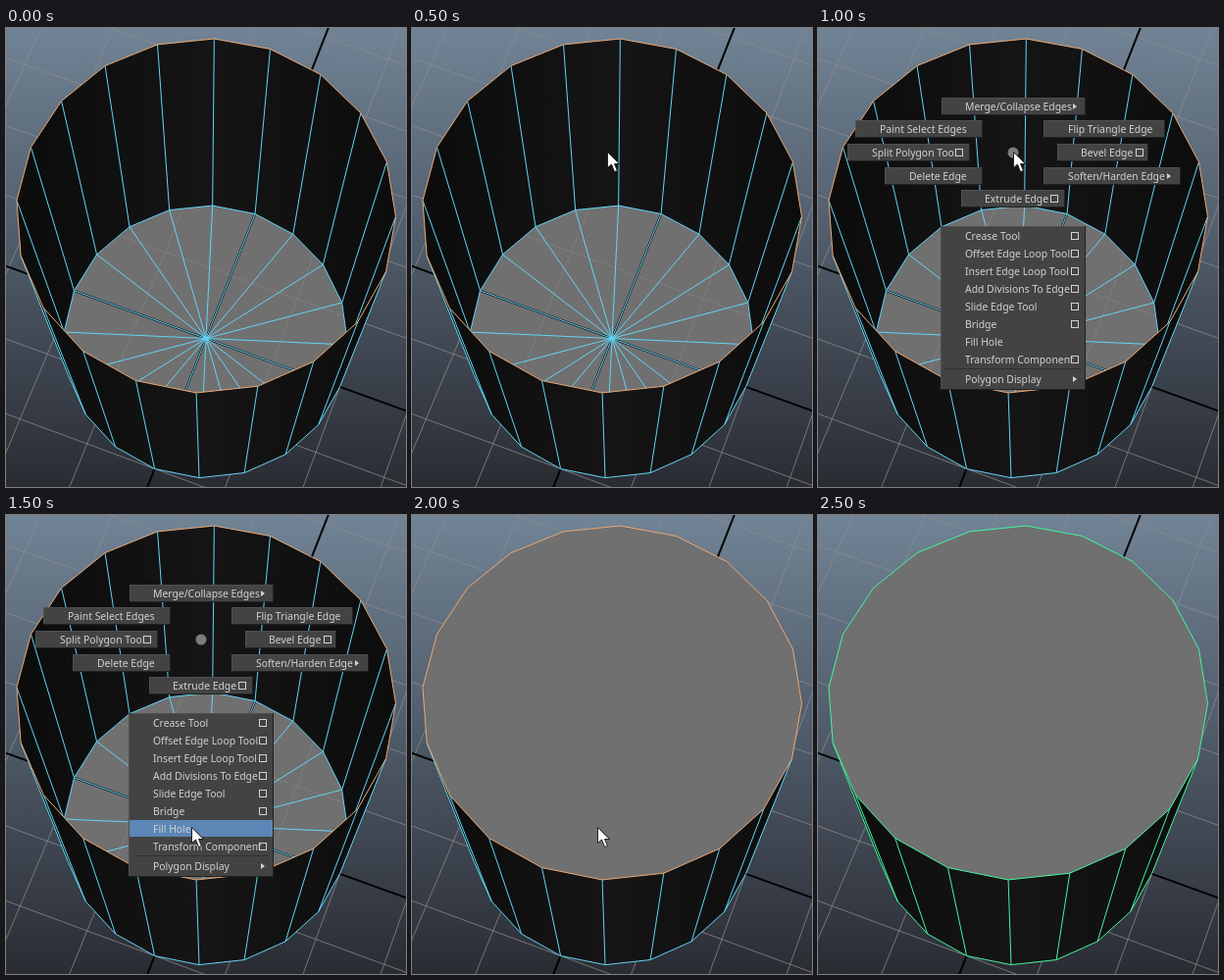
These frames come from a looping animation (408x468 px, 3 s). An HTML page with a canvas:

```html
<!DOCTYPE html>
<html lang="en">
<head>
<meta charset="utf-8">
<title>Fill Hole</title>
<style>
  html, body { margin: 0; width: 408px; height: 468px; overflow: hidden; }
  canvas { display: block; }
</style>
</head>
<body>
<canvas id="stage" width="408" height="468"></canvas>
<script>
const ctx = document.getElementById('stage').getContext('2d');
const W = 408, H = 468, SIDES = 20;
const CYAN = '#62d4f6', ORANGE = '#eba873', GREEN = '#43f5a0', GREY = '#707070';

// Perspective view of a horizontal plane: unit axes u, v around a centre.
const plane = (cx, cy, ux, uy, vx, vy, a, b) => (u, v) => {
  const depth = 1 + a * u + b * v;
  return [cx + (u * ux + v * vx) / depth, cy + (u * uy + v * vy) / depth];
};
const floorAt = plane(203.5, 316, 135.5, 49, 51.2, -129.9, -0.0074, 0.023);
const rimAt = plane(203.1, 183.5, 181, 63.5, 68.4, -168.8, -0.016, 0.0385);
const ring = at => Array.from({ length: SIDES }, (_, i) => {
  const angle = (i - 1) * 2 * Math.PI / SIDES;
  return at(Math.sin(angle), Math.cos(angle));
});
const rim = ring(rimAt), base = ring(floorAt), hub = floorAt(0, 0);
const FRONT = [6, 7, 8, 9, 10, 11, 12, 13, 14];

function trace(points, closed) {
  ctx.beginPath();
  points.forEach(p => ctx.lineTo(...p));
  if (closed) ctx.closePath();
}
function fill(points, color) {
  trace(points, true);
  ctx.fillStyle = color;
  ctx.fill();
}
function stroke(points, color, closed = false, width = 1) {
  trace(points, closed);
  ctx.strokeStyle = color;
  ctx.lineWidth = width;
  ctx.stroke();
}
function gradient(x, y, ...colors) {
  const g = ctx.createLinearGradient(0, 0, x, y);
  colors.forEach((c, i) => g.addColorStop(i / (colors.length - 1), c));
  return g;
}
const sky = gradient(0, H, '#718395', '#4e5967', '#2a2c33');
const wall = gradient(W, 0, '#0b0b0b', '#151515', '#0c0c0c');

function drawGrid(color) {
  for (let k = -4; k <= 4; k += 0.5) {
    if (!k) continue;
    stroke([floorAt(k, -4), floorAt(k, 4)], color);
    stroke([floorAt(-4, k), floorAt(4, k)], color);
  }
  stroke([floorAt(0, -4), floorAt(0, 4)], '#000', false, 2);
  stroke([floorAt(-4, 0), floorAt(4, 0)], '#000', false, 2);
}

function drawInside() {
  fill(rim, wall);
  ctx.save();
  trace(rim, true);
  ctx.clip();
  fill(base, GREY);
  ctx.save();
  trace(base, true);
  ctx.clip();
  drawGrid('#7d7d7d');
  ctx.restore();
  base.forEach((p, i) => {
    stroke([hub, p], CYAN);
    if (!FRONT.includes(i)) stroke([rim[i], p], CYAN);
  });
  stroke(base, CYAN, true);
  ctx.restore();
}

function drawCup(capped, edge, border) {
  const lower = FRONT.map(i => base[i]);
  fill([...FRONT.map(i => rim[i]), ...lower.slice().reverse()], wall);
  if (capped) fill(rim, GREY); else drawInside();
  FRONT.forEach(i => stroke([rim[i], base[i]], edge));
  stroke(lower, edge);
  stroke(rim, border, true);
}

// Marking menu: label, box left, top, width, text left, trailing mark and its x.
const RADIAL = [
  ['Merge/Collapse Edges', 126, 71, 147, 150, 'arrow', 260],
  ['Paint Select Edges', 38, 94, 130, 63],
  ['Flip Triangle Edge', 230, 94, 124, 255],
  ['Split Polygon Tool', 30, 118, 125, 55, 'box', 140],
  ['Bevel Edge', 244, 118, 93, 268, 'box', 324],
  ['Delete Edge', 68, 142, 100, 93],
  ['Soften/Harden Edge', 230, 142, 140, 255, 'arrow', 356],
  ['Extrude Edge', 146, 165, 106, 170, 'box', 237]
];
const LIST = ['Crease Tool', 'Offset Edge Loop Tool', 'Insert Edge Loop Tool',
  'Add Divisions To Edge', 'Slide Edge Tool', 'Bridge', 'Fill Hole',
  'Transform Component'];

function panel(x, y, w, h) {
  ctx.fillStyle = '#222';
  ctx.fillRect(x, y, w, h);
  ctx.fillStyle = '#505050';
  ctx.fillRect(x, y, w - 1, h - 1);
  ctx.fillStyle = '#434343';
  ctx.fillRect(x + 1, y + 1, w - 2, h - 2);
}
function label(text, x, y, mark, markX) {
  ctx.fillStyle = '#d2d2d2';
  ctx.fillText(text, x, y + 4);
  if (mark === 'box') {
    ctx.strokeStyle = '#d2d2d2';
    ctx.lineWidth = 1;
    ctx.strokeRect(markX + 0.5, y - 3.5, 7, 7);
  }
  if (mark === 'arrow') fill([[markX, y - 3], [markX + 4, y], [markX, y + 3]], '#d2d2d2');
}

function drawMenu(selected) {
  ctx.font = '10.4px "Noto Sans", "Open Sans", sans-serif';
  for (const [text, x, y, w, textX, mark, markX] of RADIAL) {
    panel(x, y, w, 18);
    label(text, textX, y + 9, mark, markX);
  }
  ctx.beginPath();
  ctx.arc(199, 127, 5.5, 0, 7);
  ctx.fillStyle = '#7c7c7c';
  ctx.fill();

  panel(125, 202, 148, 167);
  LIST.forEach((text, i) => {
    const y = 212 + i * 18;
    if (text === selected) {
      ctx.fillStyle = '#5c86b6';
      ctx.fillRect(126, y - 9, 146, 17);
    }
    label(text, 150, y, text === 'Fill Hole' ? '' : 'box', 258);
  });
  ctx.fillStyle = '#303030';
  ctx.fillRect(130, 347, 139, 1);
  label('Polygon Display', 150, 358, 'arrow', 260);
}

function drawCursor(x, y) {
  const arrow = [[0, 0], [0, 16], [4, 12.5], [7, 20], [10, 19], [7, 12], [12, 12]]
    .map(([dx, dy]) => [x + dx, y + dy]);
  fill(arrow, '#fff');
  stroke(arrow, '#222', true);
}

function drawScene(step) {
  ctx.fillStyle = sky;
  ctx.fillRect(0, 0, W, H);
  ctx.save();
  ctx.translate(0.5, 0.5);
  drawGrid('rgba(140, 140, 140, 0.75)');
  const done = step === 5;
  drawCup(step >= 4, done ? GREEN : CYAN, done ? GREEN : ORANGE);
  ctx.restore();
  if (step === 2 || step === 3) drawMenu(step === 3 ? 'Fill Hole' : '');
  if (step === 1 || step === 2) drawCursor(199.5, 126.5);
  if (step === 3 || step === 4) drawCursor(189.5, 318.5);
}

function tick() {
  drawScene(Math.floor(performance.now() % 3000 / 500));
  requestAnimationFrame(tick);
}
tick();
</script>
</body>
</html>
```
